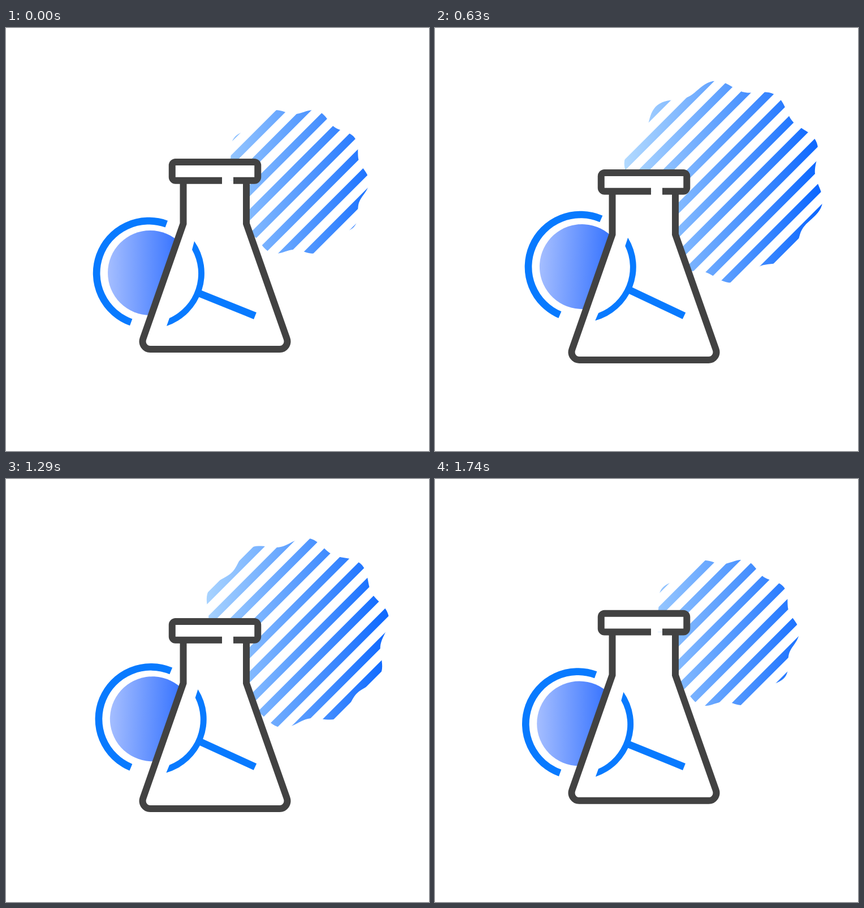
Animation of 748 by 748 pixels, one loop 1770 ms. Source, as an HTML page:

```html
<!DOCTYPE html>
<html lang="en">
<head>
<meta charset="utf-8">
<title>Flask</title>
<style>
  html, body { margin: 0; width: 100%; height: 100%; overflow: hidden; background: #fff; }
  svg { display: block; width: 100vw; height: 100vh; }
  .glass { fill: #fff; stroke: #424242; stroke-width: 12; }
  .ring { fill: none; stroke: #087aff; stroke-width: 12.7; }
</style>
</head>
<body>
<svg viewBox="0 0 748 748">
  <defs>
    <linearGradient id="sky" gradientUnits="userSpaceOnUse" x1="334" y1="0" x2="690" y2="0">
      <stop offset="0" stop-color="#b2daff"/>
      <stop offset="1" stop-color="#0663ff"/>
    </linearGradient>
    <linearGradient id="ball" gradientUnits="userSpaceOnUse" x1="180" y1="0" x2="318" y2="0">
      <stop offset="0" stop-color="#a5beff"/>
      <stop offset="1" stop-color="#2a6bff"/>
    </linearGradient>
    <clipPath id="cut"><path id="blob"/></clipPath>
  </defs>

  <g clip-path="url(#cut)">
    <path id="stripes" fill="none" stroke="url(#sky)" stroke-width="14"/>
  </g>

  <g class="swing"><circle cx="255" cy="433" r="75" fill="url(#ball)"/></g>

  <g id="flask" class="glass">
    <path d="M313.5 270V346L242.5 549C239 559 246 568 255 568H484C493 568 500 559 496.5 549L425 346V270"/>
    <path d="M382 269.75H299.75a6 6 0 0 1-6-6V243a6 6 0 0 1 6-6H439.25a6 6 0 0 1 6 6v20.75a6 6 0 0 1-6 6H402"/>
  </g>

  <g class="swing">
    <path class="ring" d="M283.8 346.6A92.3 92.3 0 0 0 221.2 520.4"/>
    <path fill="#087aff" d="M333 377A98.6 98.6 0 0 1 284 527L289 513A86.2 86.2 0 0 0 329 392Z"/>
    <path class="ring" d="M339 468.2L440.5 509"/>
  </g>
</svg>

<script>
  const LOOP = 1770, STEP = 30;
  const CX = 510, CY = 272, LOBES = 10;
  const GAP = 42.75;          // stripe period measured along x + y
  const FIRST = 633;          // x + y on the middle of one stripe

  const $ = id => document.getElementById(id);
  const swings = document.querySelectorAll('.swing');

  // Rises at an even speed, then eases out; the second half mirrors the first.
  function pulse(u) {
    const s = 1 - Math.abs(2 * u - 1), r = 1 - s;
    return 1.05 * s * r * r + 3 * s * s * r + s * s * s;
  }

  function blobPath(radius, turn) {
    const points = [];
    for (let deg = 0; deg < 360; deg += 1.5) {
      const a = deg * Math.PI / 180;
      const r = radius * (1 + 0.048 * Math.cos(LOBES * (a - turn)));
      points.push((CX + r * Math.cos(a)).toFixed(2) + ' ' + (CY + r * Math.sin(a)).toFixed(2));
    }
    return 'M' + points.join('L') + 'Z';
  }

  function stripePath(shift) {
    let d = '';
    for (let k = -6; k <= 11; k++) {
      const c = FIRST + GAP * k + shift;
      d += `M300 ${c - 300}L720 ${c - 720}`;
    }
    return d;
  }

  function draw(now) {
    const u = Math.floor(now % LOOP / STEP) * STEP / LOOP;
    const p = pulse(u);
    $('blob').setAttribute('d', blobPath(126 + 52 * p, u * 2 * Math.PI / LOBES));
    $('stripes').setAttribute('d', stripePath(2 * GAP * u));
    $('flask').setAttribute('transform', `translate(0 ${22 * p})`);
    swings.forEach(g => g.setAttribute('transform', `rotate(${4 * p} 440.5 509)`));
  }

  const start = performance.now();
  function tick() {
    draw(performance.now() - start);
    requestAnimationFrame(tick);
  }
  tick();
</script>
</body>
</html>
```
